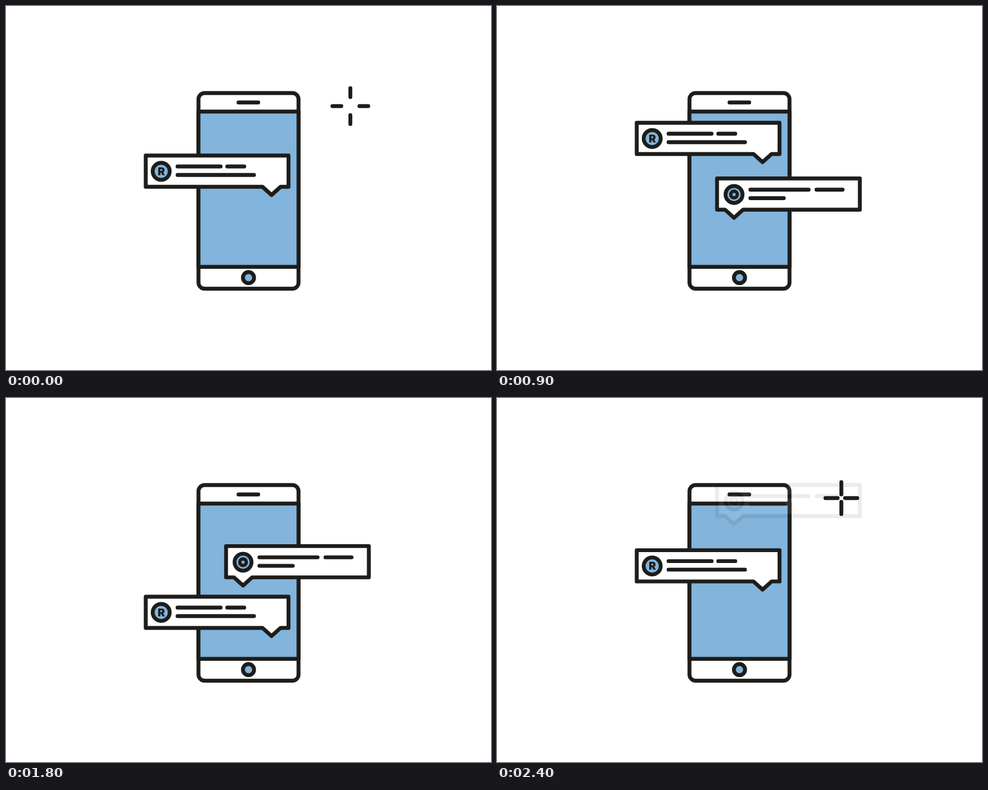
Animation of 800x600 px, one loop 2.5 s. Source, as an HTML page:

```html
<!DOCTYPE html>
<html lang="en">
<head>
<meta charset="utf-8">
<title>Phone chat</title>
<style>
  html, body { margin: 0; width: 100%; height: 100%; overflow: hidden; background: #fff; }
  svg { display: block; width: 800px; height: 600px; }
  .line { fill: none; stroke: #1d1d1b; stroke-width: 6.4; stroke-linecap: round; stroke-linejoin: round; }
  .white { fill: #fff; }
  .blue { fill: #82b4dc; }
  .dark { fill: #1d1d1b; }
  text { font: 900 18px Inter, Roboto, sans-serif; text-anchor: middle; }
</style>
</head>
<body>
<svg viewBox="0 0 800 600">
  <rect class="line white" x="317.5" y="143.5" width="165" height="322.5" rx="10"/>
  <path class="line blue" d="M317.5 174H482.5V430H317.5Z"/>
  <path class="line" d="M383.5 159H416"/>
  <circle class="line blue" cx="400" cy="447.7" r="9.2"/>
  <g id="chat">
    <g id="left">
      <path class="line white" d="M230.5 0H466V51.5H453L438 65L423 51.5H230.5Z"/>
      <circle class="line blue" cx="256" cy="26" r="14"/>
      <text class="dark" x="256.2" y="32.6">R</text>
      <path class="line" d="M283 18H354M365 18H393M283 32H409"/>
    </g>
    <g id="right">
      <path class="line white" d="M363 0H598.5V51.5H406L391 65L376 51.5H363Z"/>
      <circle class="line blue" cx="391" cy="26.5" r="14"/>
      <circle class="dark" cx="391" cy="26.5" r="8.2"/>
      <circle class="blue" cx="391" cy="26.5" r="2.6"/>
      <path class="line" d="M418 18.5H514M527 18.5H570M418 32.5H473"/>
    </g>
  </g>
  <path class="line" id="spark"/>
</svg>
<script>
const LOOP = 2500, STEP = 100, TIP = 65;
const $ = id => document.getElementById(id);
const clamp = x => Math.min(1, Math.max(0, x));
const lerp = (a, b, x) => a + (b - a) * x;
const easeInOut = x => x < 0.5 ? 2 * x * x : 1 - 2 * (1 - x) ** 2;

// entry, rest and exit are heights of the bubble's top edge
const left = { el: $('left'), pivot: 392, entry: 328.5, rest: 246.5, exit: 142 };
const right = { el: $('right'), pivot: 391, entry: 325.7, rest: 245.5, exit: 137.5 };
const turns = [
  { old: left, fresh: right, pop: 50, move: 522, span: 743, fade: 900 },
  { old: right, fresh: left, pop: 1300, move: 1736, span: 794, fade: 2100 }
];

function popScale(t) {
  return t < 250 ? 1.1 * clamp(t / 250) : lerp(1.1, 1, clamp((t - 250) / 130));
}

function place(b, y, scale, alpha) {
  b.el.setAttribute('transform',
    `translate(${b.pivot} ${y + TIP}) scale(${scale}) translate(${-b.pivot} ${-TIP})`);
  b.el.setAttribute('opacity', scale ? alpha : 0);
}

function sparkPath(cx, u) {
  const cy = 165;
  const outer = 30 * (1 - (1 - clamp((u + 200) / 400)) ** 3);
  const inner = 15 * (1 - Math.cos(Math.PI * clamp((u + 150) / 500)));
  if (outer <= 0 || inner > 29) return '';
  return [[1, 0], [-1, 0], [0, 1], [0, -1]].map(([x, y]) =>
    `M${cx + x * inner} ${cy + y * inner}L${cx + x * outer} ${cy + y * outer}`).join('');
}

function draw(t) {
  const turn = turns[t < LOOP / 2 ? 0 : 1];
  const { old, fresh } = turn;
  const k = easeInOut(clamp((t - turn.move) / turn.span));
  place(old, lerp(old.rest, old.exit, k), 1, 1 - clamp((t - turn.fade) / 325));
  place(fresh, lerp(fresh.entry, fresh.rest, k), popScale(t - turn.pop), 1);
  if ($('chat').lastElementChild !== fresh.el) $('chat').append(fresh.el);

  const late = t < 600 ? t + LOOP : t;
  $('spark').setAttribute('d', sparkPath(259, t - 1200) + sparkPath(568, late - 2400));
}

const start = performance.now();
function tick() {
  const t = (performance.now() - start) % LOOP;
  draw(Math.floor(t / STEP) * STEP);
  requestAnimationFrame(tick);
}
tick();
</script>
</body>
</html>
```
